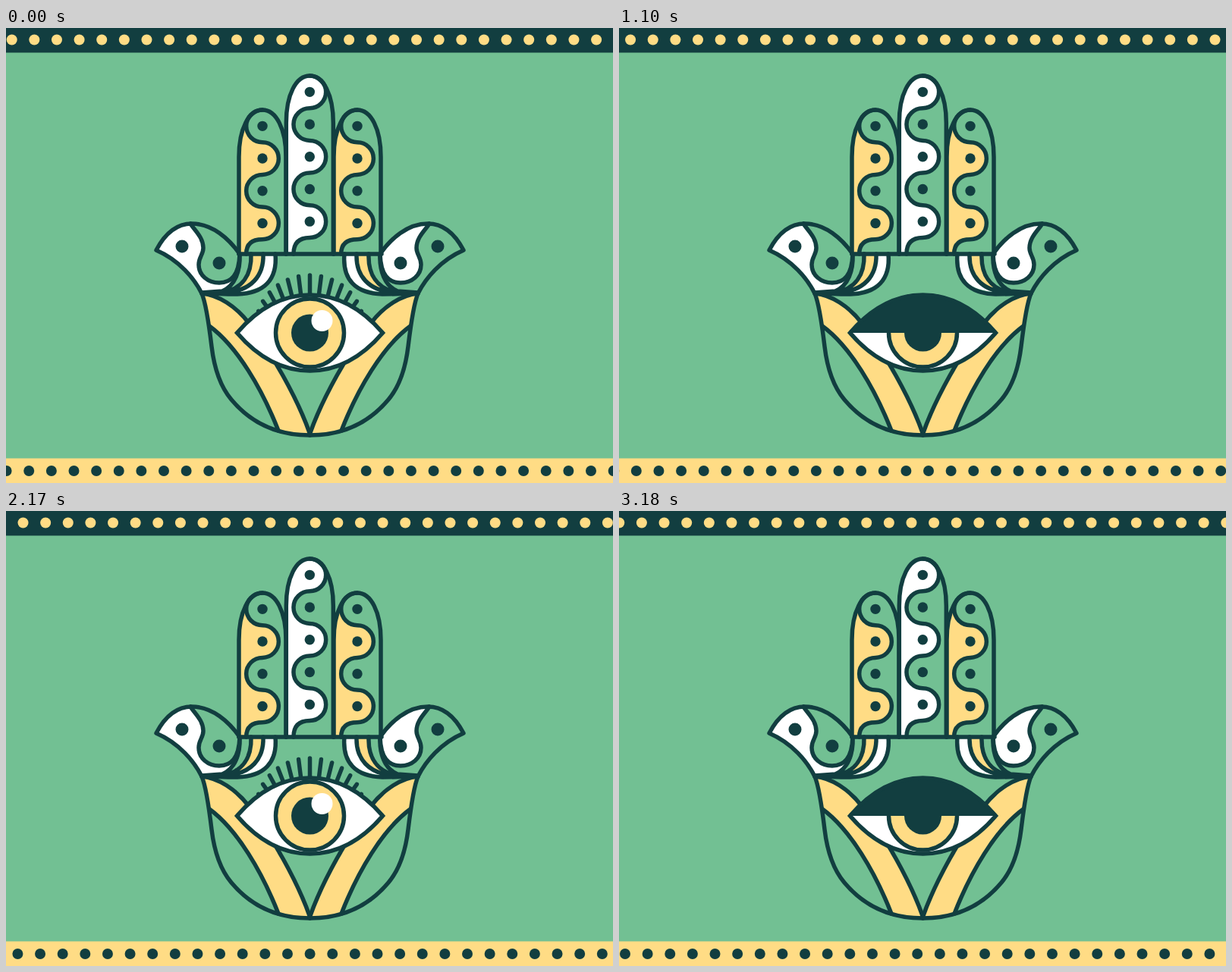
These frames come from a looping animation (800x600 px, 3.36 s). An HTML page:

```html
<!DOCTYPE html>
<html lang="en">
<head>
<meta charset="utf-8">
<title>Hand and eye</title>
<style>
  html, body { margin: 0; width: 100%; height: 100%; overflow: hidden; background: #72c093; }
  svg { display: block; width: 800px; height: 600px; }
  .line { fill: none; stroke: #123e40; stroke-width: 5.5; stroke-linejoin: round; stroke-linecap: round; }
  .dark { fill: #123e40; }
  .gold { fill: #ffdc85; }
  .white { fill: #fff; }
</style>
</head>
<body>
<svg viewBox="0 0 800 600">
  <defs>
    <path id="almond" d="M304.5 402C332 370 363 352 400.5 352S469 370 496.5 402C469 434 438 452 400.5 452S332 434 304.5 402Z"/>
    <clipPath id="eyeClip"><use href="#almond"/></clipPath>
    <g id="palmSide">
      <path class="gold" d="M258 350C280 352 303 367 320 389C350 428 384 488 400.5 536Q378 536 359 531C338 477 305 420 268 393Q266 372 258 350Z"/>
      <path class="line" d="M258 350C280 352 303 367 320 389C350 428 384 488 400.5 535M268 393C305 420 338 477 359 531"/>
      <path class="line" d="M258 350C264 364 268 395 271 420C274 445 281 471 297 490C322 520 355 537 400.5 537"/>
    </g>
    <g id="fan">
      <path class="white" d="M355 298C358 332 340 350 285 349C325 348 340 325 339 298Z"/>
      <path class="gold" d="M339 298C340 325 325 348 285 349C312 344 324 325 323 298Z"/>
      <path class="line" d="M355 298C358 332 340 350 305 351Q280 351 258 349M339 298C340 325 325 348 285 349M323 298C324 325 312 344 285 349M308 298C309 320 302 340 285 347L258 349"/>
    </g>
    <g id="thumbLines">
      <path class="line" d="M258 350C248 330 228 306 198 293C210 270 226 258 245 258C272 258 294 278 308 298"/>
      <path class="line" d="M243 258C248 266 260 276 260 290C260 299 254 302 254 312C254 326 266 336 281 336C297 336 307 326 308 298"/>
      <circle class="dark" cx="232" cy="288" r="8.5"/>
      <circle class="dark" cx="281" cy="310" r="8.5"/>
    </g>
  </defs>

  <rect width="800" height="600" fill="#72c093"/>
  <rect class="dark" width="800" height="32.5"/>
  <rect class="gold" y="567.5" width="800" height="32.5"/>
  <g id="topDots" class="gold"></g>
  <g id="lowDots" class="dark"></g>

  <use href="#palmSide"/>
  <use href="#palmSide" transform="matrix(-1 0 0 1 801 0)"/>

  <path class="white" d="M198 293C210 270 226 258 243 258C248 266 260 276 260 290C260 299 254 302 254 312C254 326 266 336 281 336C297 336 307 326 308 298C309 320 302 340 285 347L258 350C248 330 228 306 198 293Z"/>
  <use href="#fan"/>
  <use href="#thumbLines"/>
  <g transform="matrix(-1 0 0 1 801 0)">
    <path class="white" d="M243 258C248 266 260 276 260 290C260 299 254 302 254 312C254 326 266 336 281 336C297 336 307 326 308 298C294 278 272 258 243 258Z"/>
    <use href="#fan"/>
    <use href="#thumbLines"/>
  </g>

  <g id="fingers"></g>
  <path class="line" d="M307 298H495"/>

  <g id="lashes" class="line"></g>
  <g clip-path="url(#eyeClip)">
    <rect class="white" x="300" y="350" width="202" height="104"/>
    <g id="iris">
      <circle class="line" cx="400.5" cy="402" r="45" style="fill:#ffdc85"/>
      <circle class="dark" cx="400.5" cy="402" r="24.5"/>
      <circle class="white" cx="416.5" cy="386" r="14"/>
    </g>
    <rect id="lid" class="dark" x="300" y="345" width="202" height="57"/>
  </g>
  <use href="#almond" class="line" style="stroke-linejoin:miter"/>
</svg>

<script>
const NS = "http://www.w3.org/2000/svg";
const byId = id => document.getElementById(id);

function add(parent, tag, attrs) {
  const node = document.createElementNS(NS, tag);
  for (const key in attrs) node.setAttribute(key, attrs[key]);
  return parent.appendChild(node);
}

// Border dots
const GAP = 29.63;
for (let i = -2; i < 30; i++) {
  add(byId("topDots"), "circle", { cx: i * GAP, cy: 15.5, r: 7 });
  add(byId("lowDots"), "circle", { cx: i * GAP, cy: 584, r: 7 });
}

// Fingers: an arch holding a chain of half circles down to the base line
const BASE = 298;
function finger(x, top, count, firstRight, color) {
  const r = 21.35, g = byId("fingers"), l = x - 31, e = x + 31;
  const arch = `M${l} ${BASE}V${top + 62}C${l} ${top + 25} ${x - 18} ${top} ${x} ${top}` +
               `S${e} ${top + 25} ${e} ${top + 62}V${BASE}`;
  let wave = `M${x} ${top}`;
  for (let i = 0; i < count; i++) {
    wave += `a${r} ${r} 0 0 ${(i % 2 === 0) === firstRight ? 1 : 0} 0 ${2 * r}`;
  }
  wave += `Q${x - r} ${top + count * 2 * r} ${x - r} ${BASE}`;
  const clip = add(g, "clipPath", { id: "finger" + x });
  add(clip, "path", { d: arch + "Z" });
  add(g, "path", { d: `${wave}H${l - 5}V${top}Z`, fill: color, "clip-path": `url(#finger${x})` });
  add(g, "path", { d: wave, class: "line" });
  add(g, "path", { d: arch, class: "line" });
  for (let i = 0; i < count; i++) {
    add(g, "circle", { cx: x, cy: top + r * (2 * i + 1), r: 6.7, class: "dark" });
  }
}
finger(338, 108, 4, false, "#ffdc85");
finger(463, 108, 4, false, "#ffdc85");
finger(400.3, 63, 5, true, "#fff");

// Lashes spread from a point below the pupil
for (let i = -6; i <= 6; i++) {
  const a = i * 7.1 * Math.PI / 180, tip = 121 - 0.58 * i * i;
  const at = d => [400.5 + d * Math.sin(a), 447 - d * Math.cos(a)].join(" ");
  add(byId("lashes"), "path", { d: `M${at(tip)}L${at(tip - 32)}` });
}

// [start ms, lid lowered, iris shift]
const LOOP = 3360;
const STEPS = [
  [0, 0, 0], [220, 1, 0], [440, 1, -18.5], [660, 1, 0],
  [880, 1, 18.5], [1100, 1, 0], [1290, 1, 0], [1480, 0, 0],
  [1700, 0, 0], [1950, 0, 0], [2170, 0, 0], [2380, 0, 0],
  [2600, 0, 0], [2820, 1, 0], [3000, 1, 0], [3180, 1, 0]
];

function show(i) {
  const [, lowered, shift] = STEPS[i];
  const slide = (i % 4) * GAP / 4;
  byId("topDots").setAttribute("transform", `translate(${7.7 + slide})`);
  byId("lowDots").setAttribute("transform", `translate(${0.6 - slide})`);
  byId("iris").setAttribute("transform", `translate(${shift})`);
  byId("lid").style.display = lowered ? "" : "none";
  byId("lashes").style.display = lowered ? "none" : "";
}

const start = performance.now();
function tick() {
  const t = (performance.now() - start) % LOOP;
  show(STEPS.findLastIndex(step => step[0] <= t));
  requestAnimationFrame(tick);
}
tick();
</script>
</body>
</html>
```
